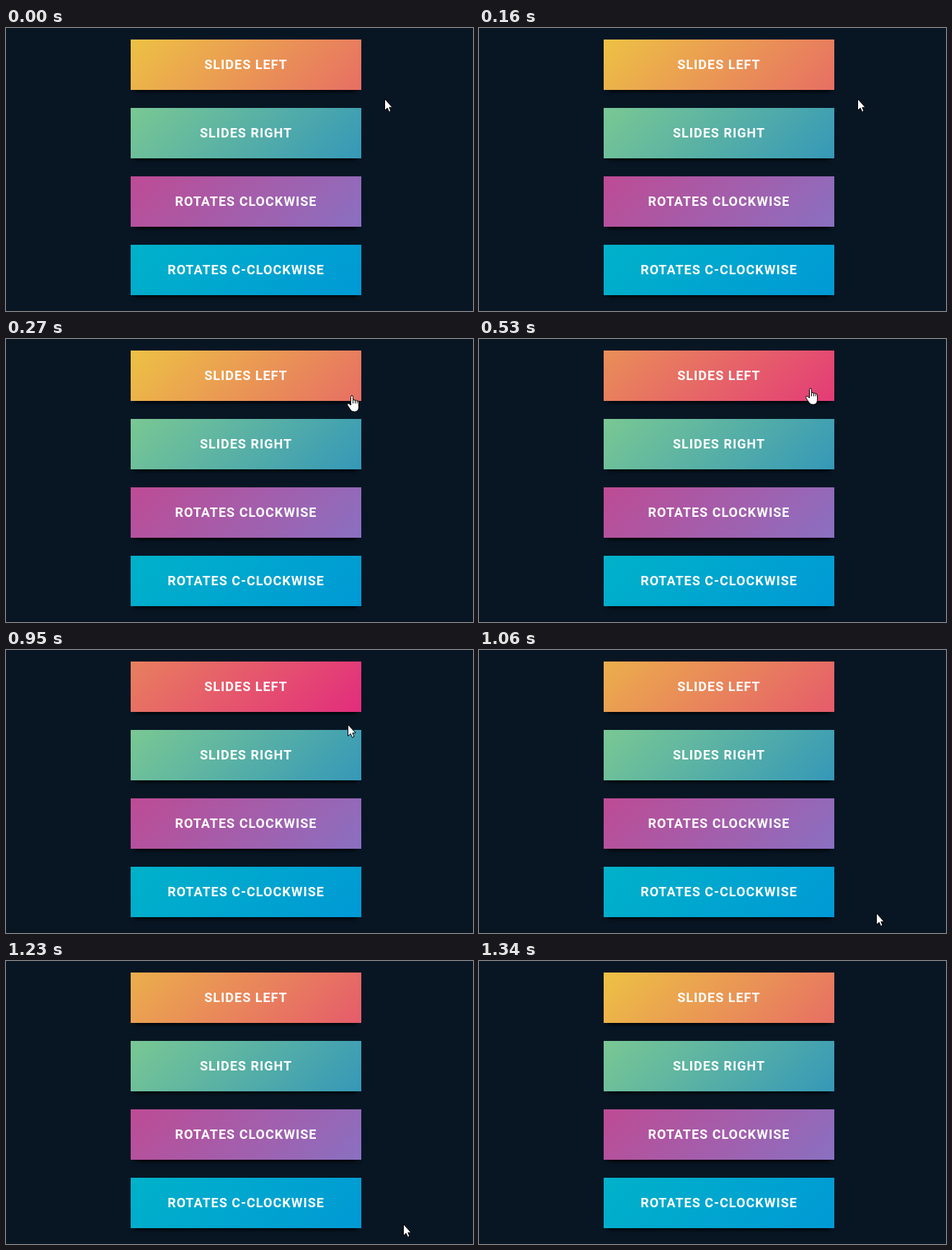
These frames come from a looping animation (648 px wide and 393 px high, 1440 ms). An HTML page:

```html
<!DOCTYPE html>
<html lang="en">
<head>
<meta charset="utf-8">
<title>Gradient buttons</title>
<style>
  html, body { margin: 0; width: 100%; height: 100%; overflow: hidden; background: #081624; }
  .button {
    position: absolute; left: 173px; width: 320px; height: 70px;
    background: linear-gradient(135deg, var(--from), var(--to));
    box-shadow: 0 8px 6px -6px #000;
    color: #fff; font: 700 18px/70px Roboto, sans-serif;
    letter-spacing: 1px; text-align: center; white-space: nowrap;
  }
  #left   { top: 16px;  --from: #edc244; --to: #e22a7e; background-size: 640px 70px; }
  #right  { top: 111px; --from: #7ac893; --to: #3598b8; }
  #clock  { top: 206px; --from: #be4b94; --to: #8a70c1; }
  #cclock { top: 301px; --from: #00b2c9; --to: #0099d5; }
  svg { position: absolute; left: 0; top: 0; }
  svg path { fill: #fff; stroke: #000; stroke-linejoin: round; }
</style>
</head>
<body>
<div class="button" id="left">SLIDES LEFT</div>
<div class="button" id="right">SLIDES RIGHT</div>
<div class="button" id="clock">ROTATES CLOCKWISE</div>
<div class="button" id="cclock">ROTATES C-CLOCKWISE</div>
<svg width="648" height="393">
  <path id="arrow" d="M.5 .5V16.5L4.2 13.2 6.5 18.5 9 17.4 6.8 12.2H11.2Z"/>
  <path id="hand" d="M5.5 14V2.5Q5.5 .5 7 .5T8.5 2.5V7.5Q8.5 6.5 10 6.5T11.5 8Q11.5 7 12.8 7T14.2 8.5Q14.5 8 15.3 8T16.5 10V16C16.5 21 14 23 10.5 23C6 23 5 20 .8 14Q0 11.5 2 11.5Q3.5 11.5 5.5 14ZM8.5 7.5V11.5M11.5 8V11.5M14.2 8.5V11.5"/>
</svg>
<script>
  const LOOP = 1440;
  const $ = id => document.getElementById(id);

  const poses = [
    { start: 0,    shift: 0,   cursor: 'arrow', x: 525, y: 98 },
    { start: 270,  shift: 0,   cursor: 'hand',  x: 473, y: 78 },
    { start: 530,  shift: 240, cursor: 'hand',  x: 453, y: 68 },
    { start: 780,  shift: 310, cursor: 'arrow', x: 474, y: 103 },
    { start: 1060, shift: 90,  cursor: 'arrow', x: 551, y: 365 },
    { start: 1340, shift: 0 }
  ];

  function draw(now) {
    const t = now % LOOP;
    const pose = poses.findLast(p => p.start <= t);
    $('left').style.backgroundPosition = `${-pose.shift}px 0`;
    for (const id of ['arrow', 'hand']) {
      const shown = pose.cursor === id;
      $(id).style.display = shown ? '' : 'none';
      if (shown) $(id).setAttribute('transform', `translate(${pose.x} ${pose.y})`);
    }
  }

  const origin = performance.now();
  function tick() {
    draw(performance.now() - origin);
    requestAnimationFrame(tick);
  }
  tick();
</script>
</body>
</html>
```
